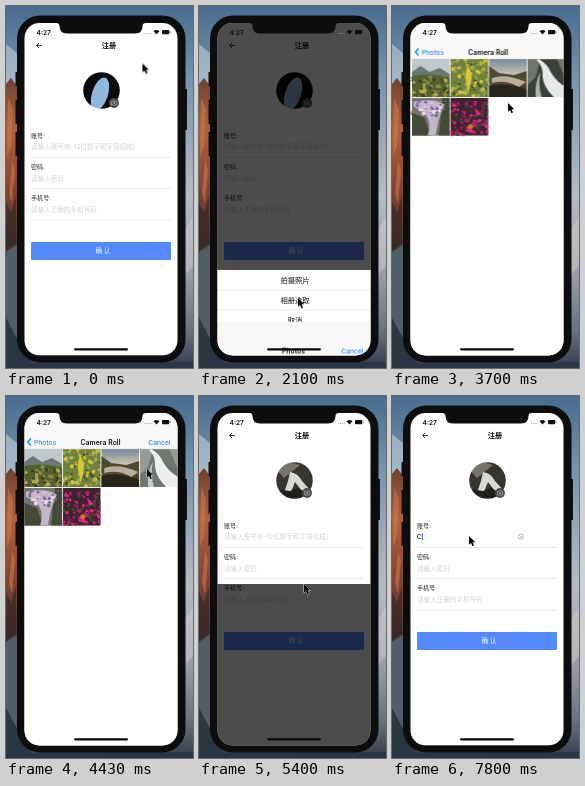
Recreate the animation shown at these times as an HTML page. Size 187 px wide and 362 px high, loop 8000 ms.

```html
<!DOCTYPE html>
<html lang="zh">
<head>
<meta charset="utf-8">
<title>注册</title>
<style>
html, body { margin: 0; width: 100%; height: 100%; overflow: hidden; background: #50657a; }
svg { display: block; width: 187px; height: 362px; }
text { font-family: Inter, "Noto Sans CJK SC", "Noto Sans CJK", sans-serif; fill: #111; }
.mid { text-anchor: middle; }
.bold { font-weight: 600; }
.label { font-size: 6.1px; fill: #222; }
.hint { font-size: 6.6px; fill: #d2d2d4; }
.blue { fill: #087bff; }
.rule { stroke: #e3e3e5; stroke-width: .7; }

.move { animation: 8s linear infinite; }
.step { animation: 8s step-end infinite; }
.cursor { animation-name: cursor; animation-timing-function: ease-in-out; }
.modal { animation-name: modal; animation-timing-function: ease; }
.picker { animation-name: picker; animation-timing-function: ease; }
.list { animation-name: list; animation-timing-function: ease; }
.list-nav { animation-name: list-nav; }
.roll { animation-name: roll; animation-timing-function: ease; }
.roll-cancel { animation-name: roll-cancel; }
.pressed { animation-name: pressed; }
.old { animation-name: old; }
.new { animation-name: new; }
.empty { animation-name: empty; }
.typed { animation-name: typed; }
.caret { animation-name: caret; }

@keyframes cursor {
  0%, 1% { transform: translate(136.5px, 57.5px); }
  10.4%, 15% { transform: translate(97px, 91px); }
  23.5%, 26.5% { transform: translate(99px, 292px); }
  33.8%, 40.5% { transform: translate(106px, 116px); }
  46.2% { transform: translate(116px, 97px); }
  54%, 57% { transform: translate(141px, 73px); }
  67.5% { transform: translate(105px, 188px); }
  79.5%, 100% { transform: translate(77px, 140px); }
}
@keyframes modal {
  0%, 11.25% { transform: translateY(332px); }
  17.05%, 65.78% { transform: none; }
  71.53%, 100% { transform: translateY(332px); }
}
@keyframes picker {
  0%, 25.6% { transform: translateY(336px); }
  31.6%, 56.5% { transform: none; }
  62.5%, 100% { transform: translateY(336px); }
}
@keyframes list {
  0%, 40.8% { transform: none; }
  47.1%, 100% { transform: translateX(-46px); }
}
@keyframes list-nav {
  0%, 40.8% { opacity: 1; }
  44%, 100% { opacity: 0; }
}
@keyframes roll {
  0%, 40.8% { transform: translateX(155px); }
  47.1%, 100% { transform: none; }
}
@keyframes roll-cancel {
  0%, 46.5% { opacity: 0; }
  48%, 100% { opacity: 1; }
}
@keyframes pressed { 0% { opacity: 0; } 54.5% { opacity: .28; } 62.5% { opacity: 0; } }
@keyframes old { 0% { opacity: 1; } 64% { opacity: 0; } }
@keyframes new { 0% { opacity: 0; } 64% { opacity: 1; } }
@keyframes empty { 0% { opacity: 1; } 87.1% { opacity: 0; } }
@keyframes typed { 0% { opacity: 0; } 87.1% { opacity: 1; } }
@keyframes caret {
  0% { opacity: 0; transform: translateX(-5px); }
  80% { opacity: 1; transform: translateX(-5px); }
  87.1% { opacity: 1; transform: none; }
  92.8% { opacity: 0; transform: none; }
  97.4%, 100% { opacity: 1; transform: none; }
}
</style>
</head>
<body>
<svg viewBox="0 0 187 362" xmlns="http://www.w3.org/2000/svg">
<defs>
  <linearGradient id="sky" x2="0" y2="1">
    <stop offset="0" stop-color="#466c8f"/><stop offset=".2" stop-color="#7694ad"/>
    <stop offset=".52" stop-color="#b4bcc5"/><stop offset=".75" stop-color="#969ca5"/>
    <stop offset=".9" stop-color="#66717f"/><stop offset="1" stop-color="#303c4a"/>
  </linearGradient>
  <linearGradient id="cliff" x2="0" y2="1">
    <stop offset="0" stop-color="#70402f"/><stop offset=".3" stop-color="#b0623d"/>
    <stop offset=".6" stop-color="#8a4630"/><stop offset="1" stop-color="#40312f"/>
  </linearGradient>
  <linearGradient id="dusk" x2="0" y2="1">
    <stop offset="0" stop-color="#74889c"/><stop offset=".45" stop-color="#d5c9b2"/>
    <stop offset=".55" stop-color="#69513a"/><stop offset="1" stop-color="#29241b"/>
  </linearGradient>
  <clipPath id="screen"><rect x="18.5" y="17" width="153" height="332.5" rx="15"/></clipPath>
  <clipPath id="disc"><circle cx="95.5" cy="84.5" r="18.3"/></clipPath>
  <clipPath id="tile"><rect width="38" height="38"/></clipPath>

  <g id="meadow" clip-path="url(#tile)">
    <path fill="#bfc8cb" d="M0 0H38V38H0Z"/>
    <path fill="#6a7775" d="M0 13L9 7 18 13 28 9 38 15V38H0Z"/>
    <path fill="#53602f" d="M0 17Q20 13 38 19V38H0Z"/>
    <g data-speckle="60 0 18 38 20" data-colors="#8b8b3a #364322 #b3a651"/>
  </g>
  <g id="leaves" clip-path="url(#tile)">
    <path fill="#71823a" d="M0 0H38V38H0Z"/>
    <g data-speckle="95 0 0 38 38" data-colors="#b4b548 #3f5525 #d3c43f #8ca050"/>
    <path fill="#d9c937" d="M17 7Q25 15 18 32Q13 18 17 7Z"/>
  </g>
  <g id="falls" clip-path="url(#tile)">
    <path fill="url(#dusk)" d="M0 0H38V38H0Z"/>
    <path fill="#4e4a32" d="M0 7L10 14 25 16 38 12V24H0Z"/>
    <path fill="#b9ada0" d="M3 19Q17 14 37 23L30 28Q17 20 3 24Z"/>
    <path fill="#29251b" d="M0 27Q17 22 38 31V38H0Z"/>
  </g>
  <g id="stream" clip-path="url(#tile)">
    <path fill="#3b4038" d="M0 0H38V38H0Z"/>
    <path fill="#70756c" d="M0 0H13L8 18 0 26ZM29 0H38V20Z"/>
    <path fill="#e6e8e9" d="M11 0Q20 5 23 13Q29 23 38 28V38H26Q16 28 15 18Q16 8 9 1Z"/>
    <path fill="#aeb4b4" d="M13 13Q10 25 14 38H8Q7 22 13 13Z"/>
  </g>
  <g id="arch" clip-path="url(#tile)">
    <path fill="#71776c" d="M0 0H38V38H0Z"/>
    <path fill="#434b36" d="M0 15L13 20 19 38H0ZM31 0H38V38H27Z"/>
    <path fill="#c7b5cc" d="M2 4Q22 0 33 7Q27 18 24 37L16 38Q23 17 2 9Z"/>
    <g data-speckle="36 2 3 32 15" data-colors="#8764a0 #e7dce9 #697a77"/>
  </g>
  <g id="flowers" clip-path="url(#tile)">
    <path fill="#3e2330" d="M0 0H38V38H0Z"/>
    <g data-speckle="110 0 4 38 34" data-colors="#c21c74 #df2b87 #96205a #3b4b27"/>
    <circle cx="20" cy="29" r="2.5" fill="#d2792d"/>
  </g>
</defs>

<!-- desktop -->
<path fill="url(#sky)" d="M0 0H187V362H0Z"/>
<path fill="#c1cdd5" opacity=".6" d="M0 38L12 48V78H0Z"/>
<path fill="url(#cliff)" d="M0 78L5 72 14 84V246H0Z"/>
<path fill="#d07c4b" opacity=".55" d="M2 92L7 103 5 140 1 151ZM6 155L9 164 6 198 3 187Z"/>
<path fill="#2c2020" opacity=".55" d="M0 196L5 207 10 190V237L0 244Z"/>
<path fill="#515d69" d="M0 246L12 238V362H0Z"/>
<path fill="#293643" d="M0 312L8 327 25 357 187 356V362H0Z"/>
<path fill="#d0d2d5" opacity=".45" d="M178 225L187 211V260L178 270Z"/>

<!-- handset -->
<path fill="#111" d="M9.5 66H13V80H9.5ZM9.5 94H13V118H9.5ZM9.5 126H13V150H9.5ZM177 83H181V124H177Z"/>
<rect x="11" y="9.5" width="168.5" height="347" rx="23" fill="#0d0d0e"/>

<g clip-path="url(#screen)">
  <path fill="#fff" d="M18 17H172V350H18Z"/>

  <!-- sign-up form -->
  <path d="M36 39.5H30.5M33 37L30.5 39.5 33 42" fill="none" stroke="#222" stroke-width=".9"/>
  <text x="103" y="42.2" class="mid bold" font-size="7.2">注册</text>
  <g clip-path="url(#disc)">
    <g class="step old">
      <path fill="#0b0c0e" d="M76 65H115V104H76Z"/>
      <ellipse cx="94" cy="88" rx="8" ry="17" fill="#8fb9dc" transform="rotate(18 94 88)"/>
    </g>
    <g class="step new">
      <path fill="#38352f" d="M76 65H115V104H76Z"/>
      <path fill="#77736a" d="M77 73L90 66 101 69 85 82Z"/>
      <path fill="#d9dad6" d="M91 76Q99 77 103 85L111 94 103 95 96 86 92 96 85 97 89 85Z"/>
      <path fill="#1f211d" d="M77 93L91 95 99 92 113 100V105H77Z"/>
    </g>
  </g>
  <circle cx="108" cy="97" r="5" fill="#4a4a4c"/>
  <path d="M105.5 95.5H107L107.6 94.7H108.8L109.4 95.5H110.7V99H105.5Z" fill="none" stroke="#bbb" stroke-width=".6"/>
  <circle cx="108.1" cy="97.1" r=".9" fill="#bbb"/>
  <text x="25" y="131.7" class="label">账号:</text>
  <text x="25" y="143.4" class="hint step empty">请输入账号(6-12位数字和字母组成)</text>
  <g class="step typed">
    <text x="24.8" y="143.3" font-size="6.8">C</text>
    <circle cx="128.8" cy="140.8" r="2.6" fill="none" stroke="#aaa" stroke-width=".8"/>
    <path d="M127.7 139.7L129.9 141.9M129.9 139.7L127.7 141.9" stroke="#aaa" stroke-width=".7"/>
  </g>
  <rect x="29.8" y="137" width="1" height="7" fill="#4664e0" class="step caret"/>
  <text x="25" y="162.9" class="label">密码:</text>
  <text x="25" y="174.6" class="hint">请输入密码</text>
  <text x="25" y="194" class="label">手机号:</text>
  <text x="25" y="205.7" class="hint">请输入正确的手机号码</text>
  <path class="rule" d="M25 151.5H165M25 182.5H165M25 214H165"/>
  <rect x="25" y="236" width="140" height="18" rx="1" fill="#5389f8"/>
  <text x="97" y="247.4" class="mid" font-size="6.4" style="fill:#fff">确 认</text>

  <!-- action sheet -->
  <g class="move modal">
    <path fill="#000" opacity=".7" d="M18 17H172V264H18Z"/>
    <path fill="#fff" d="M18 264H172V350H18Z"/>
    <path class="rule" d="M18 284H172M18 304H172"/>
    <g class="mid" font-size="7.3">
      <text x="96" y="276.7">拍摄照片</text>
      <text x="96" y="296.7">相册选取</text>
      <text x="96" y="317">取消</text>
    </g>
  </g>

  <!-- photo picker -->
  <g class="move picker">
    <path fill="#fff" d="M18 17H172V350H18Z"/>
    <g class="move list">
      <use href="#flowers" transform="translate(21.5 57) scale(.76 .79)"/>
      <use href="#flowers" transform="translate(21.5 95.5) scale(.76 .79)"/>
      <text x="56.5" y="74.8" font-size="6.4">Moments</text>
      <text x="56.5" y="109" font-size="6.4">Camera Roll</text>
      <text x="56.5" y="117.4" font-size="5.4" style="fill:#777">6</text>
      <text x="21.5" y="141.5" font-size="7" class="bold">My Albums</text>
      <path class="rule" d="M56.5 91.5H172"/>
      <path d="M162 70.2L164.7 73 162 75.8M162 108.2L164.7 111 162 113.8" fill="none" stroke="#c2c2c6" stroke-width=".9"/>
    </g>
    <g class="move roll">
      <path fill="#fff" d="M18 53H172V350H18Z"/>
      <use href="#meadow" x="18" y="53"/>
      <use href="#leaves" x="56.7" y="53"/>
      <use href="#falls" x="95.3" y="53"/>
      <use href="#stream" x="134" y="53"/>
      <path fill="#fff" class="step pressed" d="M134 53H172V91H134Z"/>
      <use href="#arch" x="18" y="91.7"/>
      <use href="#flowers" x="56.7" y="91.7"/>
    </g>
    <path fill="#f8f8f8" d="M18 17H172V53H18Z"/>
    <path d="M18 53H172" stroke="#c8c8cb" stroke-width=".5"/>
    <g class="move list-nav">
      <g class="move list"><text x="94.5" y="48.5" class="mid bold" font-size="6.9">Photos</text></g>
      <text x="164.5" y="48.5" class="blue" text-anchor="end" font-size="6.8">Cancel</text>
    </g>
    <g class="move roll">
      <path d="M25 42.4L21.8 46 25 49.6" fill="none" stroke="#087bff" stroke-width="1.3"/>
      <text x="28" y="48.5" class="blue" font-size="6.8">Photos</text>
      <text x="94.5" y="48.5" class="mid bold" font-size="6.9">Camera Roll</text>
    </g>
    <text x="164.5" y="48.5" class="blue move roll-cancel" text-anchor="end" font-size="6.8">Cancel</text>
  </g>

  <!-- system bars -->
  <text x="30.5" y="29" class="bold" font-size="6.6">4:27</text>
  <path d="M139 27.5H146" stroke="#999" stroke-width=".9" stroke-dasharray=".9 1"/>
  <path d="M147.5 25.3Q150.5 22.6 153.5 25.3L150.5 28.5Z" fill="#111"/>
  <rect x="156" y="24" width="7.3" height="4.3" rx="1" fill="#111"/>
  <path fill="#555" d="M163.8 25.3H164.5V27H163.8Z"/>
  <rect x="68" y="342.2" width="54" height="2.2" rx="1.1" fill="#080808"/>
</g>
<path fill="#0d0d0e" d="M50 16H140V17Q136.5 17 136.5 20Q136.5 27.5 129 27.5H61Q53.5 27.5 53.5 20Q53.5 17 50 17Z"/>

<path class="move cursor" d="M0 0V8.7L2 6.9 3.5 10.2 5 9.5 3.6 6.3H6.3Z" fill="#000" stroke="#fff" stroke-width=".8" paint-order="stroke"/>
</svg>
<script>
let seed = 7;
const random = () => (seed = seed * 16807 % 2147483647) / 2147483647;

// Scatter small blots inside the box given as "count x y width height".
for (const group of document.querySelectorAll("[data-speckle]")) {
  const [count, x, y, width, height] = group.dataset.speckle.split(" ").map(Number);
  const colors = group.dataset.colors.split(" ");
  for (let i = 0; i < count; i++) {
    const dot = document.createElementNS("http://www.w3.org/2000/svg", "circle");
    dot.setAttribute("cx", x + random() * width);
    dot.setAttribute("cy", y + random() * height);
    dot.setAttribute("r", .7 + random() * 1.4);
    dot.setAttribute("fill", colors[i % colors.length]);
    group.append(dot);
  }
}
</script>
</body>
</html>
```
